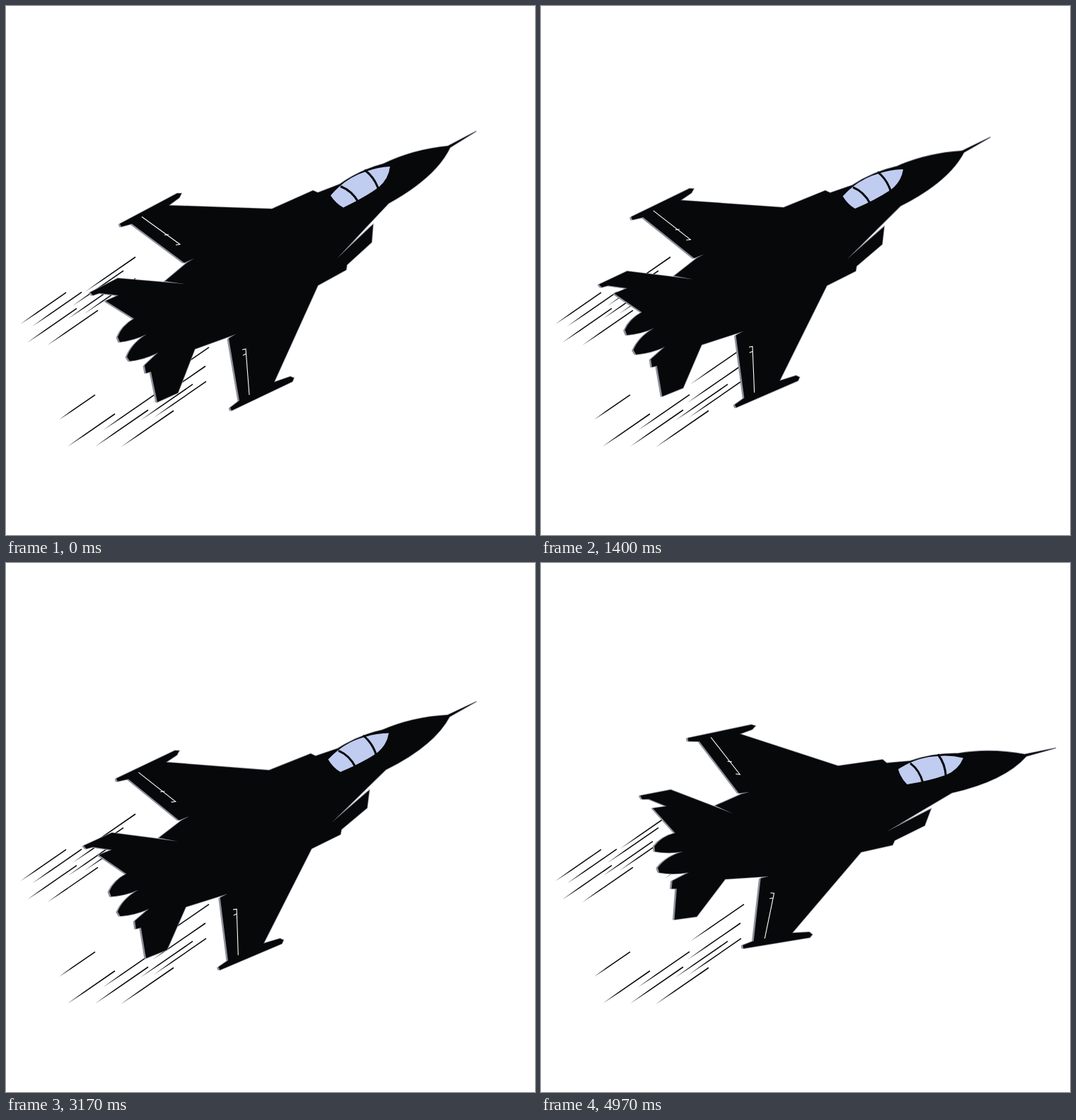
An HTML page for the animation above (5010 ms loop, 748 px wide and 748 px high).

```html
<!DOCTYPE html>
<html lang="en">
<head>
<meta charset="utf-8">
<title>Jet</title>
<style>
html, body { margin: 0; width: 100%; height: 100%; overflow: hidden; background: #fff; }
svg { display: block; width: 100%; height: 100%; }
</style>
</head>
<body>
<svg viewBox="0 0 748 748">
  <defs>
    <path id="hull" d="M665 177L628 200Q608 242 541 279L508 314L468 357L519 309L517 334L482 366L481 373L441 395
      L379 532L402 524L407 526L405 531L319 572L317 568L330 558L315 470L325 464L267 485
      L243 547L214 560L205 517L198 519L196 508L215 490Q195 500 175 502L171 496Q178 477 199 464Q180 473 161 475L158 468Q164 452 181 442
      L141 417L159 409L132 406L123 409L119 405L158 385L252 393L225 389L256 363L266 357L252 363
      L178 308L163 312L161 308L242 265L248 265L245 271L230 282L376 287L434 261L441 264L472 252Q500 232 534 223Q575 203 625 198Z"/>
  </defs>
  <path id="streaks" fill="#060809"/>
  <g id="jet">
    <use href="#hull" x="-2.5" y="1" fill="#8f8f9d"/>
    <use href="#hull" fill="#060809" stroke="#8f8f9d" stroke-width="1.6"/>
    <use href="#hull" fill="#060809"/>
    <path fill="#c0ccf0" d="M459 268Q480 243 509 234Q525 228 543 227Q541 245 526 257Q505 272 477 285Q466 279 459 268Z"/>
    <path fill="none" stroke="#060809" stroke-width="3" d="M473 255Q489 261 498 277M507 232Q521 242 527 260"/>
    <path fill="none" stroke="#fff" stroke-width="1.1" d="M192 298L246 337L240 338M230 323L224 324M334 486L339 485L344 550M335 494L339 492"/>
  </g>
</svg>
<script>
const LOOP = 5010, CENTER = 374;

// x, y of the lower end and width of each speed streak
const streaks = [
  [20, 450, 65], [37, 453, 70], [30, 476, 70], [58, 480, 72], [112, 404, 71], [94, 424, 72],
  [88, 442, 70], [111, 435, 72], [175, 446, 71], [75, 585, 51], [87, 623, 67], [126, 623, 75],
  [162, 624, 75], [137, 600, 73], [190, 586, 74], [209, 582, 74], [207, 561, 75], [211, 535, 76]
];
const taper = ([x, y, w]) => {
  const at = (f, n) => `${x + w * f + n * 0.57},${y - w * f * 0.69 + n * 0.82}`;
  return `M${at(0, 0)}L${at(0.35, 0.7)}L${at(1, 0.8)}L${at(1, -0.8)}L${at(0.35, -0.7)}Z`;
};
document.getElementById('streaks').setAttribute('d', streaks.map(taper).join(''));

// time, x shift, y shift, rotation in degrees
const keys = [
  [0, 0, 0, 0], [100, 5, -2, 0.5], [400, -74, 9, -3.5], [550, -56, 11, -4],
  [740, -20, 15, -7.5], [867, 8, 17, -7], [950, 26, 18, -5.5], [1100, -8, 14, -4],
  [1270, -66, 5, 0], [1600, 24, -7, 4.5], [1770, -2, 22, 5], [1933, 14.5, 19, 6.9],
  [2050, 18, 21, 7.6], [2300, 18, 0, 9], [2450, 8, -36, 9.5], [2567, 3, -25, 9.6],
  [2950, -25, -7, 4], [3167, -8, 6, 2.5], [3260, -4, 17, 2], [3470, 2, -24, -2],
  [3730, 0, 0, 1], [3933, -3.5, 17, 4.8], [4280, 20, 39, 6], [4560, 25, -38, 12],
  [4750, 22, 8, 15], [4967, 20, -4, 16.1]
];

function slope(i, c) {
  const a = keys[Math.max(i - 1, 0)], b = keys[Math.min(i + 1, keys.length - 1)];
  return (b[c] - a[c]) / (b[0] - a[0]);
}

function pose(t, c) {
  let i = 0;
  while (i < keys.length - 2 && keys[i + 1][0] <= t) i++;
  const a = keys[i], b = keys[i + 1], span = b[0] - a[0];
  const u = Math.min((t - a[0]) / span, 1), v = 1 - u;
  return a[c] * v * v * (1 + 2 * u) + b[c] * u * u * (3 - 2 * u)
    + span * u * v * (v * slope(i, c) - u * slope(i + 1, c));
}

const jet = document.getElementById('jet');
const start = performance.now();
function draw() {
  const now = (performance.now() - start) % LOOP;
  const t = Math.min(149, Math.floor((now + 3.4) * 0.03)) * 100 / 3;
  jet.setAttribute('transform',
    `translate(${pose(t, 1)} ${pose(t, 2)}) rotate(${pose(t, 3)} ${CENTER} ${CENTER})`);
  requestAnimationFrame(draw);
}
draw();
</script>
</body>
</html>
```
